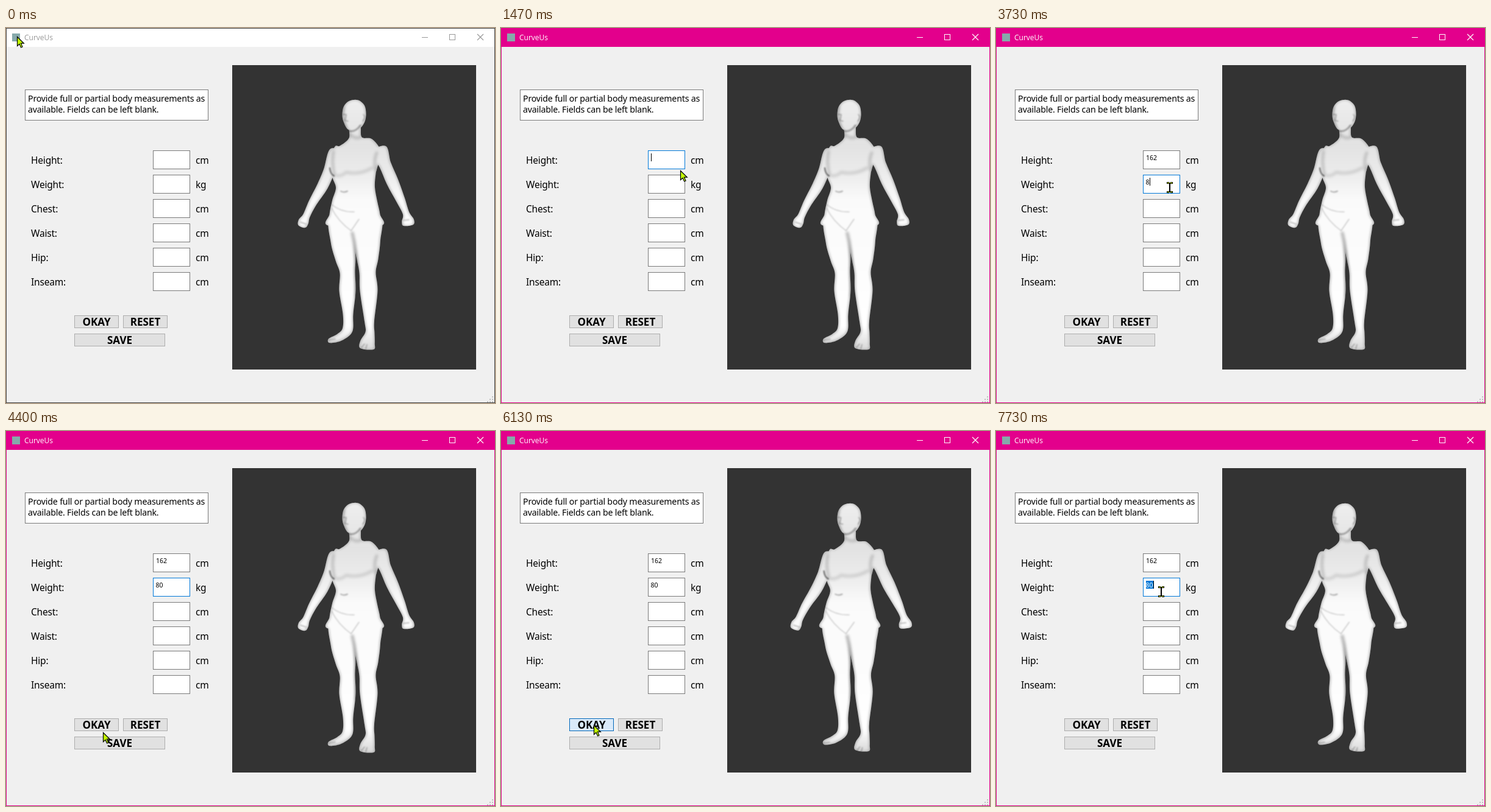
Recreate the animation shown at these times as an HTML page. Size 802 by 616 pixels, loop 8000 ms.

```html
<!DOCTYPE html>
<html lang="en">
<head>
<meta charset="utf-8">
<title>CurveUs</title>
<style>
  html, body { margin: 0; width: 100%; height: 100%; overflow: hidden; background: #f0f0f0; }
  svg { display: block; width: 802px; height: 616px; }
  text { font-family: "Noto Sans", "Open Sans", sans-serif; white-space: pre; }
  .crisp, .crisp * { shape-rendering: crispEdges; }
  .note { font-size: 14.2px; letter-spacing: -.2px; }
  .label { font-size: 15.5px; letter-spacing: -.2px; }
  .value { font-size: 10.5px; }
  .button { font-size: 17px; font-weight: 700; text-anchor: middle; }
  .title { font: 12px "Open Sans", "Noto Sans", sans-serif; }
  .box { fill: #fff; stroke: #7a7a7a; }
  .box.focus { stroke: #0078d7; }
  .btn { fill: #e1e1e1; stroke: #adadad; }
  #frame { fill: none; stroke: #444; }
  #bar { fill: #fff; }
  #name { fill: #999; }
  #controls { fill: none; stroke: #999; }
  .active #frame { stroke: #e3008c; }
  .active #bar { fill: #e3008c; }
  .active #name { fill: #fff; }
  .active #controls { stroke: #fff; }
</style>
</head>
<body>
<svg id="win" viewBox="0 0 802 616">
  <defs>
    <linearGradient id="skin" gradientUnits="userSpaceOnUse" x1="0" y1="117" x2="0" y2="531">
      <stop offset="0" stop-color="#eee"/>
      <stop offset=".18" stop-color="#e2e2e2"/>
      <stop offset=".28" stop-color="#eaeaea"/>
      <stop offset=".4" stop-color="#fafafa"/>
      <stop offset=".9" stop-color="#fff"/>
      <stop offset="1" stop-color="#d4d4d4"/>
    </linearGradient>
    <filter id="soft" filterUnits="userSpaceOnUse" x="371" y="61" width="400" height="500"><feGaussianBlur stdDeviation="2.2"/></filter>
    <filter id="fine" filterUnits="userSpaceOnUse" x="371" y="61" width="400" height="500"><feGaussianBlur stdDeviation=".9"/></filter>
    <g id="shade" fill="none" stroke="#000" stroke-linecap="round">
      <g filter="url(#soft)" stroke-width="5" stroke-opacity=".16">
        <path d="M537 203Q534 222 538 238M608 205Q603 216 606 233M566 176Q572 182 580 180"/>
        <path d="M537 241Q548 246 558 237Q580 242 600 230" stroke-opacity=".12"/>
        <path d="M568 337Q575 365 575 400V440" stroke-opacity=".28"/>
        <path d="M554 131Q551 146 557 163"/>
      </g>
      <g filter="url(#fine)" stroke-width="1.5" stroke-opacity=".3">
        <path d="M534 296Q545 318 566 333L579 314M534 290Q550 303 571 302" stroke-opacity=".2"/>
        <path d="M531 230Q532 240 538 243" stroke-opacity=".6" stroke-width="2"/>
        <path d="M549 268Q554 271 560 268" stroke-width="2"/>
        <path d="M553 142H558M558 143L556 152L561 153M586 142Q591 146 585 153"/>
        <path d="M562 169Q573 172 581 160" stroke-width="3"/>
        <path d="M483 319L492 322M652 316L661 315M529 513L540 511M583 525L588 519M590 527L592 520"/>
      </g>
    </g>
  </defs>

  <rect width="802" height="616" fill="#f0f0f0"/>
  <rect id="bar" width="802" height="31"/>
  <rect x="10" y="9" width="13" height="13" fill="#86a9ab"/>
  <text id="name" class="title" x="30" y="20">CurveUs</text>
  <g id="controls">
    <path class="crisp" d="M682 15.5h10M727.5 10.5h9v9h-9z"/>
    <path d="M773 10l10 10M783 10l-10 10" stroke-width="1.2"/>
  </g>
  <rect class="box crisp" x="31.5" y="101.5" width="300" height="50"/>
  <text class="note" x="36" y="121">Provide full or partial body measurements as</text>
  <text class="note" x="36" y="139">available. Fields can be left blank.</text>
  <g id="form"></g>
  <g id="buttons"></g>
  <rect id="mark" class="crisp" x="246" y="246" width="12" height="13" fill="#0078d7"/>
  <text class="value" x="246" y="217"></text>
  <text class="value" x="245.5" y="257"></text>
  <rect id="caret" class="crisp" width="1" height="13"/>
  <rect class="crisp" x="371" y="61" width="400" height="500" fill="#333"/>
  <g id="bodies"></g>
  <path class="crisp" fill="#bfbfbf" d="M797 605h2v2h-2zM793 609h2v2h-2zM797 609h2v2h-2zM789 613h2v2h-2zM793 613h2v2h-2zM797 613h2v2h-2z"/>
  <rect id="frame" class="crisp" x=".5" y=".5" width="801" height="615"/>
  <path id="arrow" d="M.5 .5V15.5L4 12.2L6.6 18L9 17L6.5 11.2H11.3Z" fill="#c4ff00" stroke="#000" stroke-width="1.2"/>
  <g id="beam" class="crisp">
    <path d="M-5 -9h4v1h2v-1h4v3h-4v12h4v3h-4v-1h-2v1h-4v-3h4v-12h-4z"/>
    <path d="M-4 -8h3v1h-3zM1 -8h3v1h-3zM-4 7h3v1h-3zM1 7h3v1h-3z" fill="#c4ff00"/>
  </g>
</svg>
<script>
const $ = id => document.getElementById(id);
const TICK = 1000 / 15, LOOP = 8000, BLINK = 535;

// form
const rows = ['Height', 'Weight', 'Chest', 'Waist', 'Hip', 'Inseam'];
$('form').innerHTML = rows.map((name, i) => {
  const y = 201 + 40 * i;
  return `<text class="label" x="41" y="${y + 22}">${name}:</text>
    <rect class="box field crisp" x="241.5" y="${y + .5}" width="60" height="30"/>
    <text class="label" x="311" y="${y + 22}">${name === 'Weight' ? 'kg' : 'cm'}</text>`;
}).join('');
const button = (name, x, y, w) =>
  `<rect class="btn crisp" x="${x + .5}" y="${y + .5}" width="${w}" height="20"/>
   <text class="button" x="${x + w / 2 + .5}" y="${y + 17}">${name}</text>`;
$('buttons').innerHTML = button('OKAY', 112, 472, 72) + button('RESET', 192, 472, 72) + button('SAVE', 112, 502, 148);
const fields = document.querySelectorAll('.field');
const values = document.querySelectorAll('.value');
const okay = document.querySelector('.btn');

// mannequin: each limb is a spine of "x,y,radius"
const limbs = [
  '543,203,12 530,235,9.5 519,260,9 503,287,7 493,308,6 488,318,8.5 485,326,6',
  '611,199,13 622,225,10 634,253,10 647,282,7.5 656,304,5.5 659,316,10 660,324,8',
  '550,312,19 552,350,19.5 557,380,16.5 560,402,12.5 560,432,13.5 561,470,8.5 560,496,8.5 547,508,6.5 530,514,3.5',
  '591,312,23 592,350,22 593,380,17.5 593,402,13.5 595,432,14.5 596,482,8 597,500,7.5 593,516,12 592,527,11',
  '572,160,8.5 573,180,10.5 574,188,27 577,199,38 570,225,39 571,243,35.5 573,262,32 572,284,37 572,306,41.5 572,325,42',
  '570,119,7 571,128,17 571,143,19.5 570,156,16.5 568,168,7'
];

// smooth closed outline around a spine; wider: 0 slim, 1 heavy
function outline(spine, wider, inset) {
  const p = spine.split(' ').map(s => {
    const [x, y, r] = s.split(',').map(Number);
    const swell = wider * .045 * Math.exp(-(((y - 300) / 90) ** 2));
    return [x + swell * (x - 571), y + wider * (1 - (y - 117) / 138), r * (1 + swell) - inset];
  });
  const side = sign => p.map(([x, y, r], i) => {
    const a = p[Math.max(0, i - 1)], b = p[Math.min(p.length - 1, i + 1)];
    const dx = b[0] - a[0], dy = b[1] - a[1], k = sign * r / Math.hypot(dx, dy);
    return [x - dy * k, y + dx * k];
  });
  const ring = [...side(1), ...side(-1).reverse()];
  const at = i => ring[(i + ring.length) % ring.length];
  return 'M' + ring[0] + ring.map((b, i) => {
    const a = at(i - 1), c = at(i + 1), e = at(i + 2);
    return `C${b.map((v, k) => v + (c[k] - a[k]) / 6)} ${c.map((v, k) => v - (e[k] - b[k]) / 6)} ${c}`;
  }).join('') + 'Z';
}
function mannequin(id, wider) {
  const paths = inset => limbs.map(s => `<path d="${outline(s, wider, inset)}"/>`).join('');
  const k = .035 * wider;
  return `<clipPath id="${id}Clip">${paths(0)}</clipPath>
    <g id="${id}" clip-path="url(#${id}Clip)">
      <rect x="371" y="61" width="400" height="500" fill="#a2a2a2"/>
      <g fill="url(#skin)" filter="url(#soft)">${paths(1)}</g>
      <use href="#shade" transform="matrix(${1 + k} 0 0 1 ${-571 * k} 0)"/>
    </g>`;
}
$('bodies').innerHTML = mannequin('slim', 0) + mannequin('heavy', 1);

// pointer stops: time, x, y
const stops = [
  [200, 18, 14], [1067, 291, 230], [1333, 291, 230], [1600, 297, 238], [1867, 285, 250], [2000, 285, 250],
  [2133, 286, 261], [4133, 285, 262], [4400, 159, 495], [4600, 152, 483],
  [6800, 152, 483], [6867, 160, 414], [7333, 271, 264]
];
const ramp = (t, a, b) => Math.min(1, Math.max(0, (t - a) / (b - a)));
const mix = (a, b, u) => a.map((v, i) => v + (b[i] - v) * u);

function pointer(t) {
  const last = stops.length - 1;
  const i = Math.max(1, stops.findIndex((s, n) => s[0] >= t - 1 || n === last));
  const a = stops[i - 1], b = stops[i], u = ramp(t, a[0], b[0]);
  return mix(a, b, u * u * (3 - 2 * u)).slice(1).map(Math.round);
}

// focus and typing: time, field, text
const edits = [[1125, 0, ''], [1860, 0, '1'], [2195, 0, '16'], [2395, 0, '162'],
  [2665, 1, ''], [3725, 1, '8'], [3795, 1, '80'], [5125, -1, ''], [7525, 1, '80']];
const show = (el, on) => el.setAttribute('visibility', on ? 'visible' : 'hidden');

function drawForm(t) {
  const past = edits.filter(e => e[0] <= t);
  const [since, focus, text] = past[past.length - 1] || [0, -1, ''];
  fields.forEach((f, i) => f.classList.toggle('focus', i === focus));
  values.forEach((v, i) => v.textContent = past.filter(e => e[1] === i).pop()?.[2] ?? '');

  show($('caret'), focus >= 0 && Math.floor((t - since) / BLINK) % 2 === 0);
  $('caret').setAttribute('x', 246 + 6 * text.length);
  $('caret').setAttribute('y', 206 + 40 * focus);
  const marked = t >= 7725;
  show($('mark'), marked);
  values[1].setAttribute('fill', marked ? '#fff' : '#000');
}

function drawButton(t) {
  const over = ramp(t, 4450, 4867) - ramp(t, 6840, 7333);
  const down = ramp(t, 5067, 5267) - ramp(t, 6067, 6333);
  const tint = (normal, hover, press) => `rgb(${mix(mix(normal, hover, over), press, down).map(Math.round)})`;
  okay.style.fill = tint([225, 225, 225], [229, 241, 251], [214, 232, 248]);
  okay.style.stroke = tint([173, 173, 173], [0, 120, 215], [0, 98, 176]);
}

function drawPointer(t) {
  const [x, y] = pointer(t);
  const typing = x > 240 && x < 303 && y > 200 && y < 433 && (y - 201) % 40 <= 31;
  show($('arrow'), !typing);
  show($('beam'), typing);
  $(typing ? 'beam' : 'arrow').setAttribute('transform', `translate(${x} ${y})`);
}

function draw(now) {
  const t = Math.floor((now % LOOP + 4) / TICK) * TICK;
  $('win').classList.toggle('active', t >= 1125);
  show($('slim'), t < 6125);
  show($('heavy'), t >= 6125);
  drawForm(t);
  drawButton(t);
  drawPointer(t);
}
let start;
function loop(now) {
  start ??= now;
  draw(now - start);
  requestAnimationFrame(loop);
}
draw(0);
requestAnimationFrame(loop);
</script>
</body>
</html>
```
